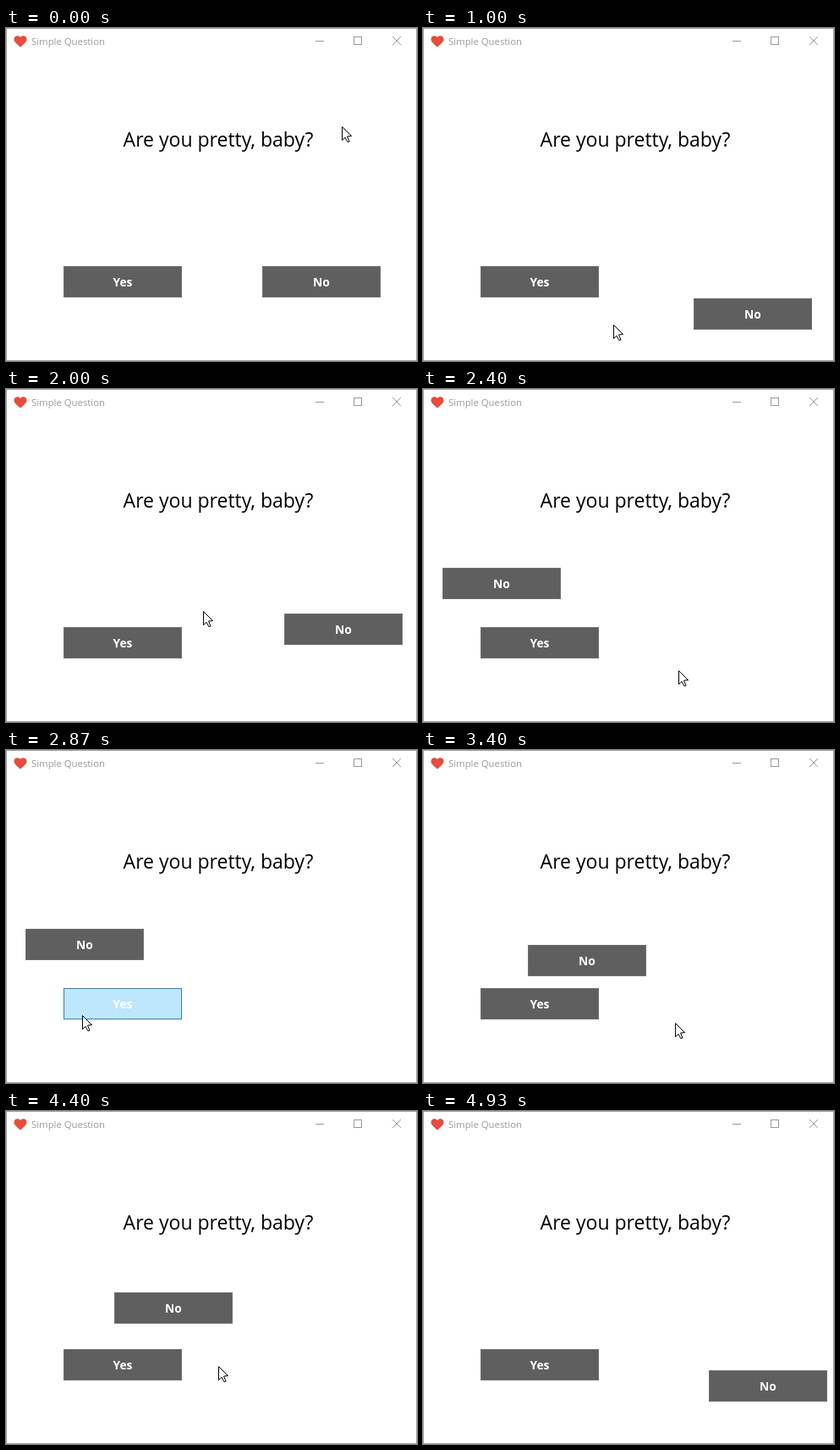
Animation of 486x393 px, one loop 5.54 s. Source, as an HTML page with a canvas:

```html
<!DOCTYPE html>
<html lang="en">
<head>
<meta charset="utf-8">
<title>Simple Question</title>
<style>
  html, body { margin: 0; width: 100%; height: 100%; overflow: hidden; background: #fff; }
  canvas { display: block; }
</style>
</head>
<body>
<canvas id="stage" width="486" height="393"></canvas>
<script>
const ctx = document.getElementById('stage').getContext('2d');
const LOOP = 5540;
const FONT = '"Open Sans", "Noto Sans", sans-serif';
const BUTTON = { w: 140, h: 37 };
const YES = { x: 68, y: 281 };
const REACH = 5; // how far the pointer gets into a button before it flees

// Places the "No" button flees to, in turn
const spots = [
  [303, 281], [55, 345], [320, 319], [175, 240], [160, 337], [22, 231],
  [329, 265], [240, 330], [23, 211], [270, 345], [124, 230], [220, 189],
  [274, 350], [116, 340], [128, 214], [338, 306]
].map(([x, y]) => ({ x, y }));

const via = (t, x, y) => ({ t, x, y });
const chase = (...times) => times.map(t => ({ t, chase: true }));

const plan = [
  via(0, 397, 116), via(130, 468, 163), via(200, 468, 163),
  ...chase(470, 930, 1200, 1400, 1600, 1870),
  via(2000, 233, 262), ...chase(2130, 2330),
  via(2870, 90, 313), ...chase(3000, 3200),
  via(3400, 298, 322), ...chase(3600, 3870),
  via(3930, 237, 259), ...chase(4070, 4270, 4530),
  via(4930, 252, 400)
];

const clamp = (v, lo, hi) => Math.max(lo, Math.min(hi, v));

// A chase ends at the point of the button nearest to the pointer
const path = [];
let caught = 0;
for (const step of plan) {
  if (step.chase) {
    const from = path[path.length - 1];
    const b = spots[caught++];
    step.x = clamp(from.x, b.x + REACH, b.x + BUTTON.w - REACH);
    step.y = clamp(from.y, b.y + REACH, b.y + BUTTON.h - REACH);
  }
  path.push(step);
}

function pointerAt(t) {
  const i = path.findIndex(p => p.t > t);
  if (i < 0) return path[path.length - 1];
  const a = path[i - 1], b = path[i];
  const k = (t - a.t) / (b.t - a.t);
  return { x: Math.round(a.x + (b.x - a.x) * k), y: Math.round(a.y + (b.y - a.y) * k) };
}

function noButtonAt(t) {
  return spots[plan.filter(s => s.chase && s.t <= t).length];
}

function isOver(p, b) {
  return p.x >= b.x && p.x < b.x + BUTTON.w && p.y >= b.y && p.y < b.y + BUTTON.h;
}

function text(str, x, y, size, color, weight = 400, align = 'left') {
  ctx.font = `${weight} ${size}px ${FONT}`;
  ctx.fillStyle = color;
  ctx.textAlign = align;
  ctx.fillText(str, x, y);
}

function line(x0, y0, x1, y1) {
  ctx.beginPath();
  ctx.moveTo(x0, y0);
  ctx.lineTo(x1, y1);
  ctx.stroke();
}

function drawHeart() {
  ctx.fillStyle = '#e74c3c';
  ctx.beginPath();
  for (const side of [-1, 1]) {
    ctx.moveTo(17, 11);
    ctx.bezierCurveTo(17 + side * 1.5, 8.3, 17 + side * 7.5, 8.2, 17 + side * 7.5, 13.2);
    ctx.bezierCurveTo(17 + side * 7.5, 15.8, 17 + side * 6, 17, 17, 22.5);
  }
  ctx.fill();
}

function drawWindow() {
  ctx.fillStyle = '#fff';
  ctx.fillRect(0, 0, 486, 393);
  ctx.lineWidth = 1;
  ctx.strokeStyle = '#a0a0a0';
  ctx.strokeRect(0.5, 0.5, 485, 392);
  drawHeart();
  text('Simple Question', 30, 20, 11.35, '#999');
  ctx.strokeStyle = '#999';
  line(366, 15.5, 376, 15.5);
  ctx.strokeRect(411.5, 10.5, 9, 9);
  line(457, 10, 467, 20);
  line(467, 10, 457, 20);
  text('Are you pretty, baby?', 251, 140, 23, '#000', 400, 'center');
}

function drawButton(label, { x, y }, hover) {
  ctx.fillStyle = hover ? '#bee6fd' : '#5f5f5f';
  ctx.fillRect(x, y, BUTTON.w, BUTTON.h);
  ctx.strokeStyle = hover ? '#3c7fb1' : '#707070';
  ctx.strokeRect(x + 0.5, y + 0.5, BUTTON.w - 1, BUTTON.h - 1);
  text(label, x + 70, y + 24, 13.8, '#fff', 700, 'center');
}

function drawPointer({ x, y }) {
  const shape = [[0, 0], [0, 16], [3.5, 12.7], [6.3, 18], [8.5, 17.5], [6, 11.5], [11, 11]];
  ctx.save();
  ctx.translate(x + 0.5, y + 0.5);
  ctx.lineJoin = 'round';
  ctx.beginPath();
  shape.forEach(([px, py]) => ctx.lineTo(px, py));
  ctx.closePath();
  ctx.fillStyle = '#fff';
  ctx.fill();
  ctx.strokeStyle = '#000';
  ctx.stroke();
  ctx.restore();
}

// The screen refreshes 15 times a second, on 10 ms ticks
function snap(t) {
  return Math.round(Math.floor(t * 0.015 + 0.051) / 0.15) * 10;
}

function draw(now) {
  const t = snap(now % LOOP);
  const pointer = pointerAt(t);
  drawWindow();
  drawButton('Yes', YES, isOver(pointer, YES));
  drawButton('No', noButtonAt(t), false);
  drawPointer(pointer);
}

const start = performance.now();
function tick() {
  draw(performance.now() - start);
  requestAnimationFrame(tick);
}
tick();
</script>
</body>
</html>
```
